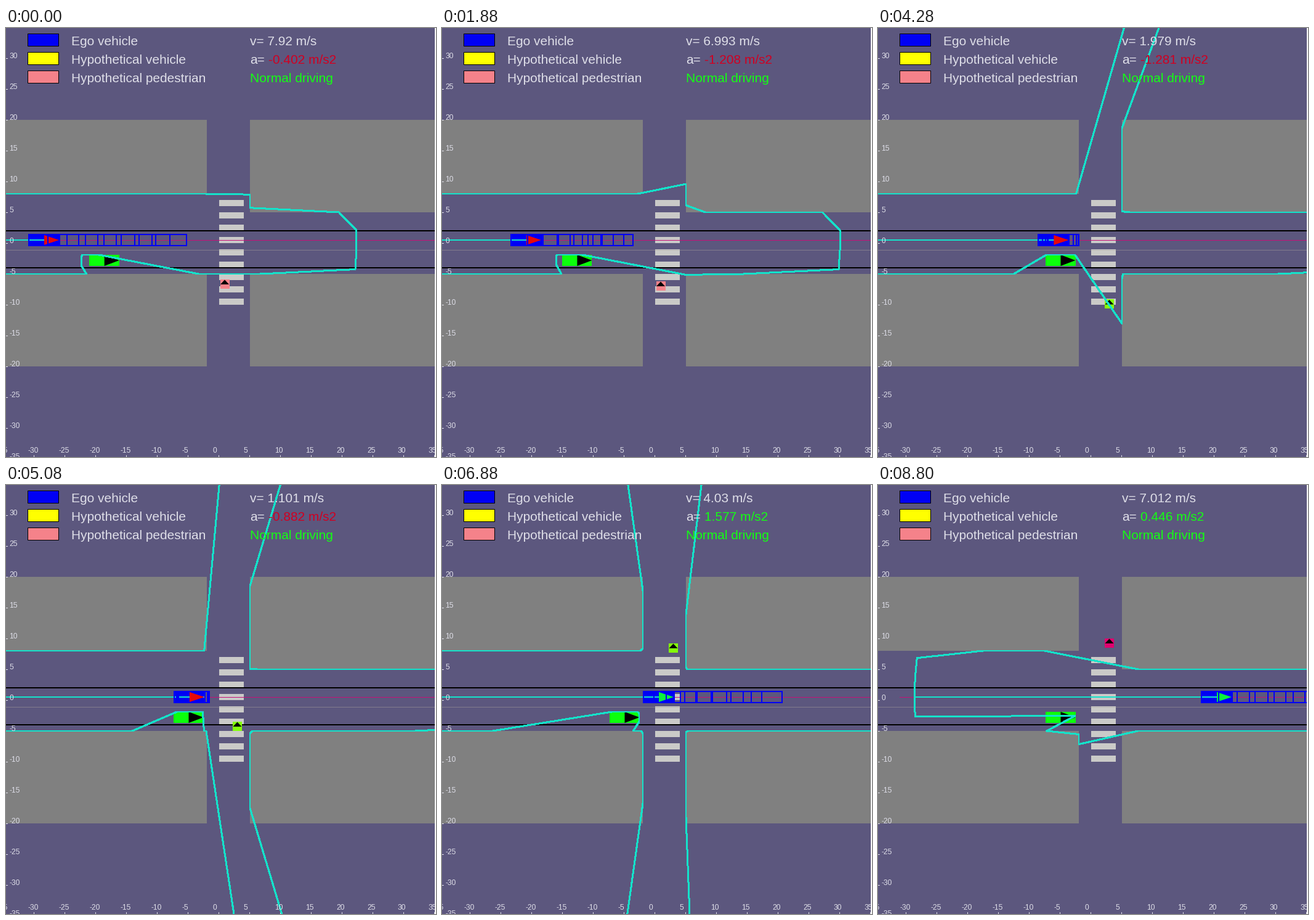
Animation, 698 px wide and 696 px high, one loop 8.88 s. Source, as a matplotlib script:

```python
import numpy as np
import matplotlib.pyplot as plt
from matplotlib.animation import FuncAnimation
from matplotlib.patches import Polygon, Rectangle

W, H, DPI = 698, 696, 100
PX = 72 / DPI
TICK_MS, LOOP_MS = 40, 8880
X0, Y0, SCALE = 346, 349, 10      # world origin in pixels, pixels per metre
RANGE, RAYS, SCAN_LAG = 500, 100, 0.225
CAR_STOP = 272

BLUE, PINK, CYAN, GREEN = "#0000f5", "#f5828a", "#14e2ca", "#14ff14"
TEXT, RED_TEXT = "#dedee8", "#d00022"

# Key states of the ego vehicle: step, left edge (px), speed, acceleration
STEP, EGO_X, SPEED, ACCEL = np.transpose([
    (0, 37, 7.92, -.402), (9, 62, 7.7, -.65), (19, 112, 6.993, -1.208),
    (32, 222, 3.869, -1.83), (51, 273, 1.101, -.882), (69, 327, 4.03, 1.577),
    (81, 445, 6.347, .722), (88, 525, 7.012, .446)])
RATE = np.minimum(.15, .03 + .004 * STEP)      # simulated seconds per step

# x, y, width, height
BUILDINGS = [(-1000, 149, 1326, 120), (396, 149, 1300, 150),
             (-1000, 399, 1326, 150), (396, 399, 1300, 150)]


def glide(k, values, slopes):
    """Cubic through the key steps with given slopes per step."""
    i = min(np.searchsorted(STEP, k, side="right"), len(STEP) - 1)
    d = STEP[i] - STEP[i - 1]
    u = (k - STEP[i - 1]) / d
    return ((2 * u**3 - 3 * u**2 + 1) * values[i - 1]
            + (u**3 - 2 * u**2 + u) * d * slopes[i - 1]
            + (3 * u**2 - 2 * u**3) * values[i] + (u**3 - u**2) * d * slopes[i])


def ego_state(k):
    return (glide(k, EGO_X, SCALE * SPEED * RATE), glide(k, SPEED, ACCEL * RATE),
            float(np.interp(k, STEP, ACCEL)))


def car_state(ego_x):
    """The other car brakes evenly to its stop while the ego approaches."""
    u = max(0, 243 - ego_x)
    gap = .456 * u + .00101 * u * u
    return CAR_STOP - gap, np.sqrt(2.46 * gap / SCALE)


def scan(sensor, boxes):
    """Loop from the sensor through the end of every ray and back."""
    angle = np.linspace(-np.pi, np.pi, RAYS)
    ray = np.column_stack([np.cos(angle), -np.sin(angle)])
    low = np.array(boxes)[:, :2]
    high = low + np.array(boxes)[:, 2:]
    t0, t1 = ((edge - sensor) / ray[:, None] for edge in (low, high))
    near, far = np.minimum(t0, t1).max(-1), np.maximum(t0, t1).min(-1)
    reach = np.where((near < far) & (near > 0), near, RANGE).min(1)
    reach = np.minimum(reach, RANGE)
    return np.vstack([sensor, sensor + ray * reach[:, None], sensor])


def pedestrians(k):
    if k >= 43:
        y = max(256.5, 391.5 - 7.06 * (k - 51))
        return [("#84ff0a" if k < 72 else "#e0006e", 375.5, y)]
    found = [(PINK, 355, np.interp(k, [0, 19, 32], [415.5, 418.5, 404]))]
    if 26 <= k < 40:
        found.append((PINK, 352.5, 436.5))
    return found


def forecast_path(x, v, a):
    """Outlines of the ego at 0.4 s intervals, braking at most to a stop."""
    t = 0.4 * np.arange(8)
    if a < 0:
        t = np.minimum(t, -v / a)
    left = np.round(x + SCALE * (v * t + a * t * t / 2))
    right, gap = left + 50, np.full(8, np.nan)
    xs = np.column_stack([left, right, right, left, left, gap])
    ys = np.tile([335, 335, 353, 353, 335, np.nan], 8)
    return xs.ravel(), ys


def arrow(x, y, length, half):
    return [(x, y - half), (x + length, y), (x, y + half)]


fig = plt.figure(figsize=(W / DPI, H / DPI), dpi=DPI, facecolor="#5c577e")
ax = fig.add_axes([0, 0, 1, 1])
ax.set(xlim=(0, W), ylim=(H, 0))
ax.axis("off")


def box(x, y, w, h, color, z=1, edge="none"):
    return ax.add_patch(Rectangle((x, y), w, h, fc=color, ec=edge, lw=PX, zorder=z))


def shape(color, z):
    return ax.add_patch(Polygon([(0, 0)] * 3, fc=color, ec="none", zorder=z))


def line(xs, ys, color, width, z, **kw):
    return ax.plot(xs, ys, color=color, lw=width * PX, zorder=z, **kw)[0]


def label(x, y, s, size=20.9, color=TEXT):
    return ax.text(x, y, s, color=color, fontsize=size * PX, zorder=9,
                   family="Liberation Sans", va="baseline")


# Buildings, crossing and lanes
for b in BUILDINGS:
    box(*b, "#808080")
for i in range(9):
    box(346, 279 + 20 * i, 40, 10, "#cacac8")
for y in (329, 389):
    line([0, 696], [y, y], "black", 2, 2)
line([0, 696], [360, 360], "#a8a29c", 1, 2, dashes=(1, 1))
line([35, 696], [344, 344], "#c71078", 1, 2)
box(696, 0, 2, H, "#f6f6f6", 10)

# Rulers
for v in range(-35, 40, 5):
    x, y = X0 + SCALE * v, Y0 - SCALE * v
    label(x - 10, 689, str(v), 12)
    line([x - 1] * 2, [693, 696], TEXT, 1, 3)
    if v < 35:
        label(5.5, y, str(v), 12)
        line([0, 1.5], [y, y], TEXT, 1, 3)

# Legend
for i, (name, color) in enumerate([("Ego vehicle", BLUE),
                                   ("Hypothetical vehicle", "#ffff00"),
                                   ("Hypothetical pedestrian", PINK)]):
    box(35, 9 + 30 * i, 50, 20, color, 8, "black")
    label(106, 28.5 + 30 * i, name)
speed_text = label(396, 28.5, "")
label(396, 58.5, "a=")
accel_text = label(425.5, 58.5, "")
label(396, 88.5, "Normal driving", color=GREEN)

# Moving parts
car = box(0, 368, 48.5, 18, "#0cff0c", 3)
car_arrow = shape("black", 3.5)
walkers = [(box(0, 0, 15, 15, PINK, 3), shape("black", 3.5)) for _ in range(2)]
ego = box(0, 334, 50, 20, BLUE, 4)
outline = line([], [], CYAN, 2, 5, antialiased=False)
ego_arrow = shape("red", 6)
forecast = line([], [], BLUE, 2, 7, solid_joinstyle="miter")


def update(i):
    t = i * TICK_MS
    k = t // 200 * 2 + (t % 200 >= 80)    # steps last 80 and 120 ms in turn
    x, v, a = ego_state(k)
    car_x, car_v = car_state(x)

    ego.set_x(round(x))
    ego_arrow.set_xy(arrow(x + 25, 344, 24, 8))
    ego_arrow.set_facecolor("#e80808" if a < 0 else "#0af53c")
    forecast.set_data(*forecast_path(x, v, a))
    car.set_x(car_x)
    car_arrow.set_xy(arrow(car_x + 24.5, 377, 24, 9))

    # The scan shows where both vehicles were a moment earlier
    lag = SCALE * SCAN_LAG
    seen_car = (car_x - lag * car_v, 368, 48, 18)
    sensor = np.array([x + 50 - lag * v, 344])
    outline.set_data(*scan(sensor, BUILDINGS + [seen_car]).T)

    people = pedestrians(k)
    for n, (body, head) in enumerate(walkers):
        shown = n < len(people)
        body.set_visible(shown)
        head.set_visible(shown)
        if shown:
            color, px, py = people[n]
            body.set_xy((px - 7.5, py - 7.5))
            body.set_facecolor(color)
            head.set_xy([(px - 7, py + .5), (px, py - 7), (px + 7, py + .5)])

    speed_text.set_text(f"v= {round(float(v), 3)} m/s")
    accel_text.set_text(f"{round(a, 3)} m/s2")
    accel_text.set_color(RED_TEXT if a < 0 else GREEN)
    return []


anim = FuncAnimation(fig, update, frames=LOOP_MS // TICK_MS, interval=TICK_MS,
                     repeat=True, repeat_delay=0)
plt.show()
```
